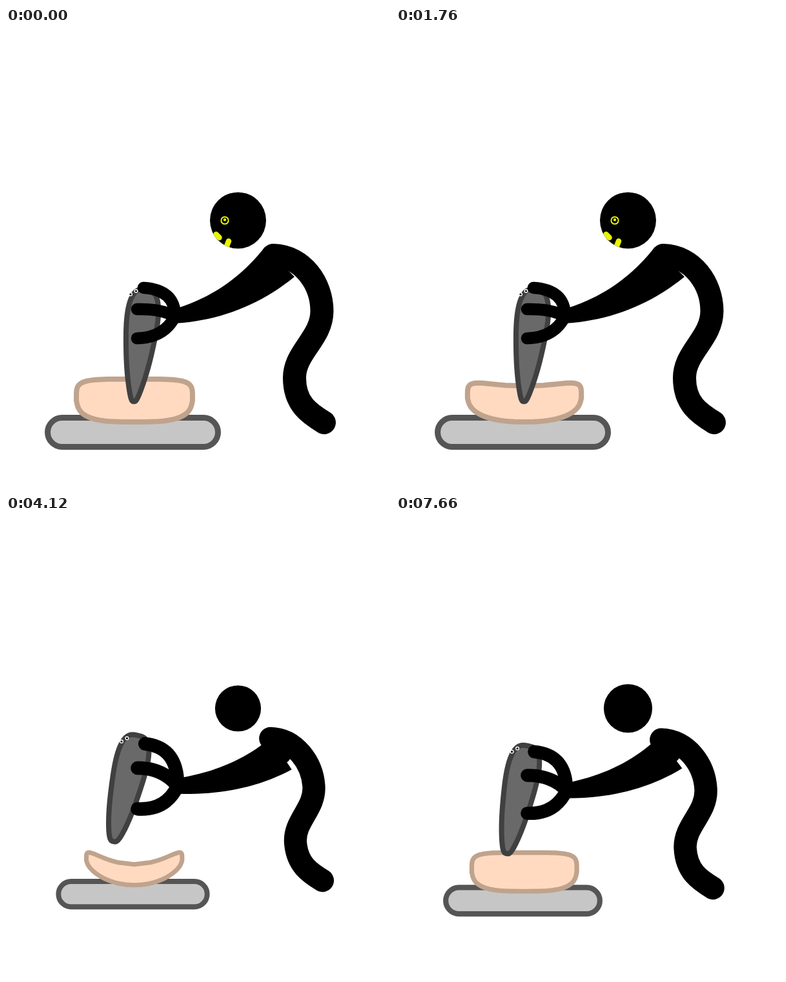
Recreate the animation shown at these times as an HTML page. Size 595 by 710 pixels, loop 7700 ms.

```html
<!DOCTYPE html>
<html lang="en">
<head>
<meta charset="utf-8">
<title>Kneading</title>
<style>
  html, body { margin: 0; width: 100%; height: 100%; overflow: hidden; background: #fff; }
  svg { display: block; width: 595px; height: 710px; }
</style>
</head>
<body>
<svg viewBox="0 0 595 710" stroke-linecap="round" stroke-linejoin="round">
  <defs><clipPath id="skull"><circle r="43.5"/></clipPath></defs>
  <g id="table">
    <rect x="64.5" y="601.5" width="264" height="45" rx="22.5" fill="#c6c6c6" stroke="#555" stroke-width="9"/>
    <path id="dough" fill="#ffdac1" stroke="#c0a38c" stroke-width="8"/>
  </g>
  <g id="hand">
    <g id="knife">
      <path id="blade" fill="#696969" stroke="#404040" stroke-width="8"/>
      <g id="eyes">
        <circle r="3" fill="#fff"/><circle r="1.6"/>
        <circle cx="8.5" cy="-5" r="3" fill="#fff"/><circle cx="8.5" cy="-5" r="1.6"/>
      </g>
    </g>
    <path id="fingers" fill="none" stroke="#000"/>
  </g>
  <path id="arm"/>
  <circle id="joint" r="16"/>
  <path id="body" fill="none" stroke="#000"/>
  <g id="head">
    <circle id="ball"/>
    <g id="face" clip-path="url(#skull)" stroke="#e6f500" fill="none">
      <circle cx="-20.5" r="5.6" stroke-width="2"/>
      <circle cx="-20.5" cy="-1" r="2.2" fill="#e6f500" stroke="none"/>
      <path d="M-34 21.5L-29 26.5M-14.5 32L-18 41" stroke-width="8.5"/>
    </g>
  </g>
  <g id="mini" stroke="#d8ea1c" stroke-width="2" fill="none">
    <circle cx="4" cy="-11" r="4"/><circle cx="4.5" cy="-10.5" r=".8"/>
    <circle cx="-10" cy="10" r="4"/><circle cx="-9.5" cy="10.5" r=".8"/>
    <path d="M-14 0L-14 -3M-11 -8L-7 -10"/>
  </g>
</svg>
<script>
const LOOP = 7700, STEP = 40, BEAT = 1000;
const ZOOM_OUT = 4040, ZOOM_IN = 7260, ZOOM = 440;
const $ = id => document.getElementById(id);
const set = (id, attrs) => { for (const k in attrs) $(id).setAttribute(k, attrs[k]); };
const show = (id, on) => set(id, { visibility: on ? 'visible' : 'hidden' });
const lerp = (a, b, k) => a + (b - a) * k;
const spow = (v, n) => Math.sign(v) * Math.abs(v) ** n;
const outline = pts => 'M' + pts.map(p => p.map(v => v.toFixed(2)).join(' ')).join('L') + 'Z';

// Between close-up (u = 0) and normal view (u = 1): x eases out, y is steady
const blend = (near, far, u) => [lerp(near[0], far[0], 1 - (1 - u) ** 2), lerp(near[1], far[1], u)];

const PALM_NEAR = [376, 290], PALM = [262, 445];

// Tip and bend of each finger: close-up, then normal view
const FINGERS = [
  [[287, 129], [405, 145], [213, 401], [262, 404]],
  [[222, 187], [318, 190], [203, 434], [240, 433]],
  [[224, 331], [330, 350], [203, 479], [245, 478]]
];

// Closed loop of points from a rule taking cos and sin
function ring(rule, n = 96) {
  return outline(Array.from({ length: n }, (_, i) => {
    const a = i / n * 2 * Math.PI;
    return rule(Math.cos(a), Math.sin(a));
  }));
}

// Rounded box whose top sinks and ends curl up as it is pressed
const doughShape = dent => ring((c, s) => {
  const n = s < 0 ? 5 : 3.2;
  const q = spow(c, 2 / n), v = spow(s, 2 / n);
  const sink = 24 * (1 - q * q) * (1 - v) / 2, curl = 18 * q * q * (1 + v) / 2;
  return [199 + (90 - 4 * dent) * q * (1 - 0.07 * Math.max(0, v)), 575 + 33 * v + dent * (sink - curl)];
});

// Rounded bar that tapers into a blade
function bladeShape(u) {
  const n = lerp(4, 3, u), half = lerp(70.5, 87, u);
  return ring((c, s) => {
    const along = spow(s, 2 / n);
    const width = 27 * (1 - 0.7 * u * ((1 + along) / 2) ** 1.7);
    return [width * spow(c, 2 / n), half * along];
  });
}

// Band along a quadratic curve, its half width going from w0 to w1
function band(a, b, c, w0, w1) {
  const left = [], right = [];
  for (let t = 0; t <= 1.001; t += 0.05) {
    const at = i => lerp(lerp(a[i], b[i], t), lerp(b[i], c[i], t), t);
    const dir = i => lerp(b[i] - a[i], c[i] - b[i], t);
    const x = at(0), y = at(1), w = lerp(w0, w1, t) / Math.hypot(dir(0), dir(1));
    left.push([x + dir(1) * w, y - dir(0) * w]);
    right.unshift([x - dir(1) * w, y + dir(0) * w]);
  }
  return outline(left.concat(right));
}

// The body folds up behind the wrist in the close-up
function bodyShape(u) {
  const p = (x, y) => {
    const k = (y - 351) / 258;
    return [lerp(391 + 88 * k, x, u), lerp(309 + 45 * k, y, u)].join(' ') + ' ';
  };
  return 'M' + p(414, 351) + 'C' + p(460, 352) + p(489.5, 395) + p(489.5, 437) +
    'S' + p(447, 500) + p(447, 540) + 'S' + p(470, 595) + p(493, 609);
}

// Height of the hand: 0 pressed down, 1 fully raised
function lift(t) {
  const p = t % BEAT;
  if (t >= 4000 || p >= 590) return 0;
  return Math.sin(Math.PI / 2 * (p < 300 ? p / 300 : (590 - p) / 290)) ** 2;
}

function view(t) {
  if (t <= ZOOM_OUT) return 1;
  if (t < ZOOM_OUT + ZOOM) return 1 - (t - ZOOM_OUT) / ZOOM;
  return Math.max(0, (t - ZOOM_IN) / ZOOM);
}

function draw(t) {
  const u = view(t), s = lift(t);

  const size = lerp(0.3, 1, u);
  set('table', { transform: `translate(196.5 ${lerp(402, 624, u)}) scale(${size}) translate(-196.5 -624)` });
  set('dough', { d: doughShape(t < ZOOM_IN ? (t / 3480) ** 1.2 : 0) });

  const raised = [PALM[0] - 34 * s - 14 * s * s, PALM[1] - 196 * s + 63 * s * s];
  const turn = 82 * s - 20 * s * s;
  set('hand', { transform: `translate(${raised}) rotate(${turn}) translate(${-PALM[0]} ${-PALM[1]})` });

  const [kx, ky] = blend([193, 108], [207, 490], u);
  const sway = -55 * Math.sqrt(u * (1 - u));
  set('knife', { transform: `translate(${kx + sway} ${ky})` });
  set('blade', { d: bladeShape(u), transform: `rotate(${lerp(44, 6, u)})` });
  set('eyes', { transform: `translate(${lerp(28, -14, u)} ${lerp(-43, -79, u)})` });

  const palm = blend(PALM_NEAR, PALM, u);
  const finger = ([tip, bend, farTip, farBend]) =>
    `M${blend(tip, farTip, u)}Q${blend(bend, farBend, u)} ${palm}`;
  set('fingers', { d: FINGERS.map(finger).join(''), 'stroke-width': lerp(32, 18.5, u) });

  const wrist = blend(PALM_NEAR, raised, u);
  const elbow = blend([440, 336], [357 + 0.7 * (raised[0] - PALM[0]), 428], u);
  const shoulder = blend([493, 393], [424 - 6 * s, 361], u);
  set('arm', { d: band(wrist, elbow, shoulder, lerp(16, 11, u), lerp(16, 32.5, u)) });
  set('joint', { cx: shoulder[0], cy: shoulder[1] });

  set('body', { d: bodyShape(u), 'stroke-width': lerp(32, 36, u) });
  set('head', { transform: `translate(${359.5 + 40 * s} ${297 - 20 * s}) rotate(${13 * s})` });
  set('ball', { r: 43.5 * u });
  set('mini', { transform: `translate(${palm}) scale(${1 - 0.6 * u})` });

  show('table', u > 0);
  show('body', u > 0);
  show('eyes', u > 0.5);
  show('face', u === 1);
  show('mini', u < 0.5);
}

// Half a step of lead keeps each pose on screen from its exact start
const start = performance.now();
function tick() {
  const t = performance.now() - start + STEP * 0.45;
  draw(Math.floor(t % LOOP / STEP) * STEP);
  requestAnimationFrame(tick);
}
tick();
</script>
</body>
</html>
```
